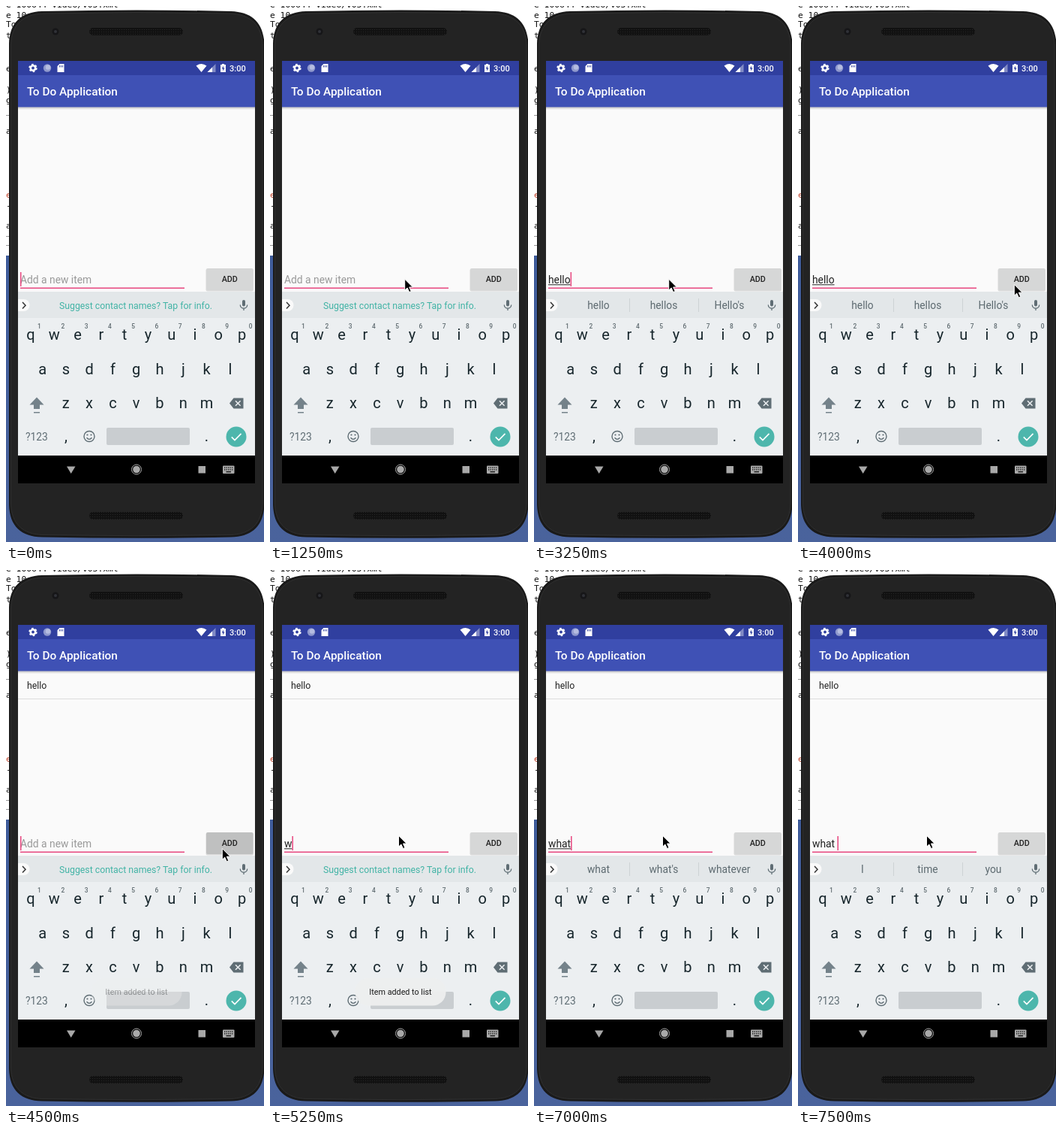
An HTML page that plays this animation: 344x713 px, repeating every 8 s.

```html
<!DOCTYPE html>
<html lang="en">
<head>
<meta charset="utf-8">
<title>To Do Application</title>
<style>
  html, body { margin: 0; width: 100%; height: 100%; overflow: hidden; background: #fff; }
  svg { display: block; width: 344px; height: 713px; font-family: Roboto, sans-serif; }
  text { white-space: pre; }
  .mono { font: 11.3px "DejaVu Sans Mono", monospace; fill: #111; }
  .mid { text-anchor: middle; }
  .key { font-size: 20px; fill: #17262c; }
  .digit { font-size: 8.4px; fill: #5f6b70; }
  .word { font-size: 13.8px; fill: #5d6a70; }
  .bold { font-weight: 500; }
  .icon { fill: #5f6d74; }
</style>
</head>
<body>
<svg viewBox="0 0 344 713">
  <defs>
    <linearGradient id="desk" x2="0" y2="1">
      <stop offset="0" stop-color="#3f5c9b"/>
      <stop offset="1" stop-color="#4a639c"/>
    </linearGradient>
    <linearGradient id="shade" x2="0" y2="1">
      <stop offset="0" stop-color="#000" stop-opacity=".22"/>
      <stop offset="1" stop-color="#000" stop-opacity="0"/>
    </linearGradient>
    <pattern id="mesh" width="3" height="3" patternUnits="userSpaceOnUse">
      <rect width="3" height="3" fill="#111"/>
      <circle cx="1.5" cy="1.5" r=".6" fill="#2a2a2a"/>
    </pattern>
    <clipPath id="screen"><rect x="16" y="73" width="316" height="562"/></clipPath>
  </defs>

  <!-- desktop -->
  <rect width="344" height="332" fill="#fff"/>
  <rect y="332" width="344" height="381" fill="url(#desk)"/>
  <g id="page" class="mono"></g>

  <!-- phone -->
  <path d="M4 50C5 22 20 8 48 7Q174 4 300 7C328 8 343 22 344.500 50V664C343 692 328 706 300 706.500Q174 709 48 706.500C20 706 5 692 4 664Z" fill="#1a1a1a"/>
  <path d="M6.500 52C7.500 25 22 11 50 10Q174 7 298 10C326 11 341 25 342 52V662C341 689 326 703 298 703.500Q174 706 50 703.500C22 703 7.500 689 6.500 662Z" fill="#232323" stroke="#303030"/>
  <rect x="111" y="29" width="125" height="10" rx="5" fill="url(#mesh)"/>
  <rect x="111" y="673" width="125" height="10" rx="5" fill="url(#mesh)"/>
  <circle cx="66" cy="34" r="4.500" fill="#161618"/>
  <circle cx="66" cy="34" r="2" fill="#303238"/>

  <g clip-path="url(#screen)">
    <rect x="16" y="73" width="316" height="562" fill="#fafafa"/>

    <!-- status and title bars -->
    <rect x="16" y="92" width="316" height="42.500" fill="#3f51b5"/>
    <rect x="16" y="73" width="316" height="19" fill="#303f9f"/>
    <rect x="16" y="134.500" width="316" height="3.500" fill="url(#shade)"/>
    <g fill="#fff">
      <circle cx="36" cy="82.500" r="3.200" fill="none" stroke="#fff" stroke-width="2.600"/>
      <circle cx="36" cy="82.500" r="4.800" fill="none" stroke="#fff" stroke-width="1.800" stroke-dasharray="2.500 2.527"/>
      <circle cx="55" cy="82.500" r="5.200" fill="#8f99cd"/>
      <circle cx="56" cy="81.500" r="3.300" fill="#b5bce0"/>
      <path d="M71.500 77H77.500V88H68.500V80Z"/>
      <path d="M71.500 79v2.500M73.500 79v2.500M75.500 79v2.500" stroke="#303f9f" stroke-width=".9"/>
      <path d="M253.500 79.500Q260.500 74.500 267.500 79.500L260.500 88Z"/>
      <path d="M279.500 77V88H268.500Z" opacity=".4"/>
      <path d="M275 81.500V88H268.500Z"/>
      <path d="M288 77h3v1h2v10h-7v-10h2Z"/>
      <path d="M290 79.500l-2.300 4h1.600v3l2.300-4h-1.600Z" fill="#303f9f"/>
      <text class="bold" x="298" y="86.500" font-size="11">3:00</text>
      <text class="bold" x="28" y="119" font-size="15.400">To Do Application</text>
    </g>

    <!-- list -->
    <g id="item">
      <text x="28" y="157.500" font-size="12.300" fill="#222">hello</text>
      <path d="M16 171.500H332" stroke="#dcdcdc"/>
    </g>

    <!-- entry row -->
    <text id="hint" x="19" y="369" font-size="13.840" fill="#999">Add a new item</text>
    <text id="entry" x="19" y="369" font-size="13.840" fill="#222"></text>
    <path id="under" stroke="#222"/>
    <path d="M19 375.200H238" stroke="#e8467f" stroke-width="1.600"/>
    <rect id="caret" y="354" width="1.500" height="19" fill="#e8467f"/>
    <rect x="266.500" y="349.500" width="63.500" height="30" rx="2" fill="#000" opacity=".13"/>
    <rect id="button" x="267" y="349" width="62.500" height="29" rx="2"/>
    <text class="mid bold" x="298.300" y="367.300" font-size="10.770" fill="#222">ADD</text>

    <!-- suggestions -->
    <rect x="16" y="380" width="316" height="35" fill="#e3e7e9"/>
    <path d="M16 390H23.500A8 8 0 0 1 23.500 406H16Z" fill="#fafafa"/>
    <path d="M22 394l4 4.300-4 4.300" fill="none" stroke="#333" stroke-width="1.500"/>
    <text id="tip" class="mid" x="173" y="403" font-size="12.300" fill="#41b3a5">Suggest contact names? Tap for info.</text>
    <g id="words">
      <path d="M127.500 389V407M219.500 389V407" stroke="#cdd2d4"/>
    </g>
    <g class="icon">
      <rect x="315" y="391" width="4" height="8.500" rx="2"/>
      <path d="M312.300 397.500a4.700 4.700 0 0 0 9.400 0M317 402v3" fill="none" stroke="#5f6d74" stroke-width="1.300"/>
    </g>

    <!-- keyboard -->
    <rect x="16" y="415" width="316" height="183" fill="#eceff1"/>
    <g id="keys"></g>
    <g class="icon">
      <path d="M41 520.500L50.500 530.500H45V536H37V530.500H31.500Z" fill="#74828a"/>
      <rect x="37" y="540" width="8" height="1.500" fill="#74828a"/>
      <path d="M303.500 521.500H316.500V535.500H303.500L298 528.500Z"/>
      <path d="M306 525.200l6.600 6.600M312.600 525.200l-6.600 6.600" stroke="#eceff1" stroke-width="1.500"/>
      <text class="mid" x="41" y="577.500" font-size="13.800">?123</text>
      <circle cx="111" cy="572.500" r="7" fill="none" stroke="#5f6d74" stroke-width="1.400"/>
      <circle cx="108.500" cy="570.500" r="1.100"/>
      <circle cx="113.500" cy="570.500" r="1.100"/>
      <path d="M107.500 574.300q3.500 4 7 0" fill="none" stroke="#5f6d74" stroke-width="1.300"/>
    </g>
    <rect x="134" y="561" width="111" height="23" rx="2" fill="#c9cdd0"/>
    <circle cx="307" cy="573" r="13.500" fill="#4db6ac"/>
    <path d="M300.800 573.300l4.200 4.200 8.500-8.600" fill="none" stroke="#fff" stroke-width="1.700"/>

    <!-- navigation -->
    <rect x="16" y="598" width="316" height="37" fill="#000"/>
    <g fill="#a9a9a9">
      <path d="M81 612.500H92.500L86.700 622Z"/>
      <circle cx="174" cy="616.500" r="4.800"/>
      <circle cx="174" cy="616.500" r="6.500" fill="none" stroke="#a9a9a9"/>
      <rect x="256.500" y="612" width="9.500" height="9.500"/>
      <rect x="289" y="611.500" width="15.500" height="10.500" rx="1"/>
      <path d="M291 614.200H303M291 616.800H303" stroke="#000" stroke-width="1.300" stroke-dasharray="1.300 1.200"/>
      <path d="M293.500 619.700H300" stroke="#000" stroke-width="1.200"/>
    </g>

    <g id="toast">
      <rect x="113.500" y="543" width="121" height="36.500" rx="18" fill="#eeefef"/>
      <text class="mid" x="174" y="565.200" font-size="10.770" fill="#111">Item added to list</text>
    </g>
  </g>

  <path id="arrow" d="M0 0V14.800L3.400 11.600L6 17.300L8.500 16.200L6 10.700H10.700Z" fill="#000" stroke="#fff" stroke-width="1" stroke-linejoin="round"/>
</svg>
<script>
const LOOP = 8000;
const $ = id => document.getElementById(id);

function addText(parent, x, y, cls, str) {
  const el = document.createElementNS("http://www.w3.org/2000/svg", "text");
  el.setAttribute("x", x);
  el.setAttribute("y", y);
  el.setAttribute("class", cls);
  el.textContent = str;
  parent.append(el);
  return el;
}

function set(id, attrs) {
  for (const name in attrs) $(id).setAttribute(name, attrs[name]);
}

// Lines of the page that peek out behind the phone
const lines = [[2, "e 100644 video/v03.xml"], [16, "e 10"], [28, "To"], [43, "ti"], [87, "e"],
  [115, ")"], [129, "g"], [143, "_"], [170, "a"], [255, "e"], [269, "-"], [296, "a"], [304, "_"], [316, "_"]];
for (const [y, str] of lines) {
  const line = addText($("page"), 0, y, "mono", str);
  if (y === 255) line.style.fill = "#c4472f";
}

const STEP = 31.28;
const rows = [["qwertyuiop", 33, 444], ["asdfghjkl", 48.6, 489.5], ["zxcvbnm", 79.8, 535]];
for (const [letters, x, y] of rows) {
  [...letters].forEach((c, i) => addText($("keys"), x + i * STEP, y, "key mid", c));
}
[..."1234567890"].forEach((c, i) => addText($("keys"), 44.5 + i * STEP, 428.5, "digit mid bold", c));
addText($("keys"), 80, 579, "key mid", ",");
addText($("keys"), 267.5, 579, "key mid", ".");
const words = [86, 173, 260.5].map(x => addText($("words"), x, 403, "word mid", ""));

// Each track holds [start time, value] steps
const typed = [[0, ""], [2750, "he"], [3000, "hel"], [3250, "hello"], [4500, ""],
  [5250, "w"], [5500, "wha"], [7000, "what"], [7500, "what "]];
const guesses = [[0, ""], [3000, "hel hello help"], [3250, "hello hellos Hello's"], [4500, ""],
  [5500, "wha what what's"], [7000, "what what's whatever"], [7500, "I time you"]];
const pointer = [[0, null], [500, [172.8, 385.3]], [750, [179.7, 363.3]], [4000, [288.3, 370.5]], [5000, [171.5, 353.3]]];
const buttonFill = [[0, "#d6d7d7"], [4250, "#c6c7c7"], [4500, "#bfc0c0"], [4750, "#cdcece"], [5000, "#d6d7d7"]];
const toastAlpha = [[0, 0], [4500, .35], [4750, .8], [5000, .95], [6500, .85], [6750, .35], [7000, 0]];
const blinks = [250, 750, 1250, 1750, 2250, 2750, 3750, 4250, 5000, 5250, 6000, 6500];

const at = (track, t) => track.filter(step => step[0] <= t).pop()[1];
const show = (id, on) => set(id, { visibility: on ? "visible" : "hidden" });

function draw(t) {
  const text = at(typed, t);
  $("entry").textContent = text;
  const end = 19 + (text ? $("entry").getComputedTextLength() : 0);
  show("hint", !text);
  show("under", text && !text.endsWith(" "));
  set("under", { d: `M19 370.800H${end}` });
  set("caret", { x: end });
  show("caret", blinks.filter(b => b <= t).length % 2 === 0);

  const guess = at(guesses, t);
  show("tip", !guess);
  show("words", guess);
  guess.split(" ").forEach((word, i) => { words[i].textContent = word; });

  const pos = at(pointer, t);
  show("arrow", pos);
  if (pos) set("arrow", { transform: `translate(${pos})` });

  set("button", { fill: at(buttonFill, t) });
  set("toast", { opacity: at(toastAlpha, t) });
  show("item", t >= 4500);
}

const start = performance.now();
function tick() {
  draw((performance.now() - start) % LOOP);
  requestAnimationFrame(tick);
}
tick();
</script>
</body>
</html>
```
